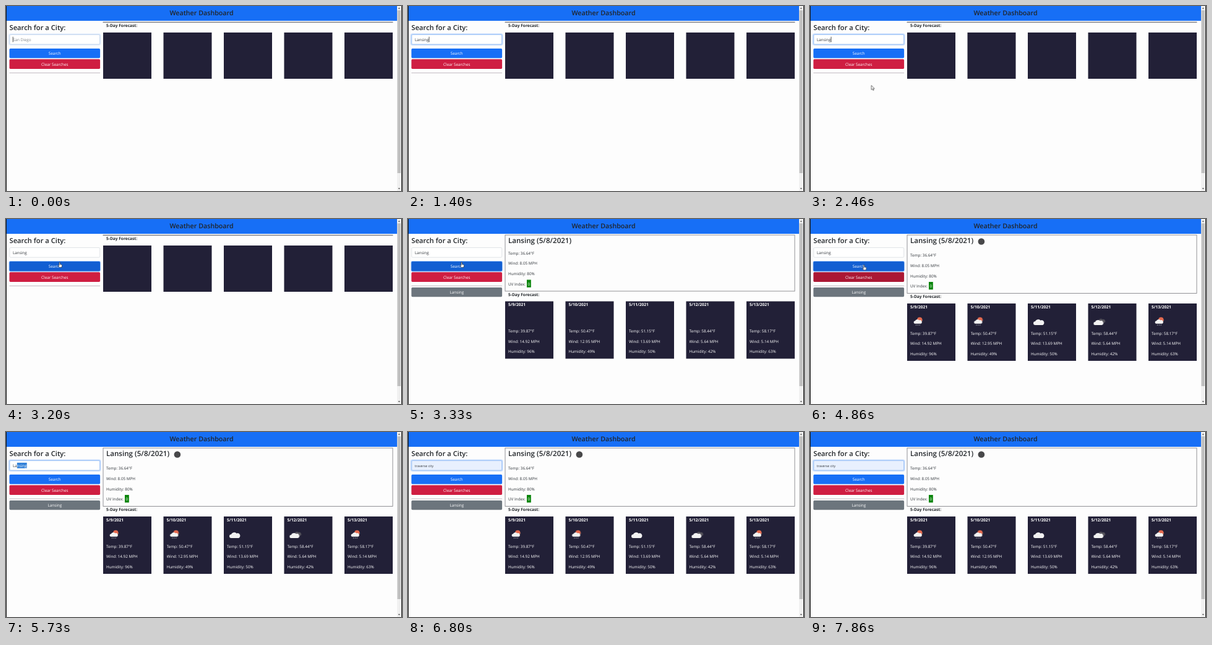
Write an HTML page that moves like this. It is 640 px wide and 300 px high and loops after 8 s.

```html
<!DOCTYPE html>
<html lang="en">
<head>
<meta charset="utf-8">
<title>Weather Dashboard</title>
<style>
  html, body { margin: 0; width: 100%; height: 100%; overflow: hidden; background: #fdfdfd; }
  svg { display: block; width: 640px; height: 300px; }
  text {
    font: 6.35px "Open Sans", "Noto Sans", sans-serif;
    fill: #30353a; text-rendering: geometricPrecision; white-space: pre;
  }
  .title { font-size: 10.7px; font-weight: 600; fill: #212529; text-anchor: middle; }
  .head { font-size: 11.2px; font-weight: 600; fill: #212529; }
  .city { font-size: 11.6px; }
  .bold { font-size: 6.6px; font-weight: 700; fill: #212529; }
  .white { fill: #fff; }
  .btn { fill: #fff; text-anchor: middle; }

  .anim { animation: 8s linear infinite; }
  .step { animation: 8s step-end infinite; }

  #focus { animation-name: focus; }
  #search { fill: #176ff6; animation-name: search; }
  #ring { animation-name: ring; }
  #clear { fill: #cf1e42; animation-name: clear; }
  .results { animation-name: results; }
  .icons { animation-name: icons; }
  #box { animation-name: box; }
  #lines { animation-name: lines; }
  #forecast { animation-name: forecast; }
  .card { fill: #222037; animation-name: card; }
  #pointer { animation-name: pointer; }
  #shown { animation-name: shown; }
  #arrow { animation-name: arrow; }
  #hand { animation-name: hand; }

  @keyframes focus {
    0%, 3.25% { opacity: .45; }
    5.75%, 40% { opacity: 1; }
    40.01%, 65% { opacity: 0; }
    66.9%, 100% { opacity: 1; }
  }
  @keyframes search {
    0%, 35.5% { fill: #176ff6; }
    37.4%, 65% { fill: #125fd2; }
    66.9%, 100% { fill: #176ff6; }
  }
  @keyframes ring { 0% { opacity: 0; } 40% { opacity: 1; } 65%, 100% { opacity: 0; } }
  @keyframes clear {
    0%, 32.4% { fill: #cf1e42; }
    34%, 35.5% { fill: #aa1833; }
    37.4%, 54% { fill: #cf1e42; }
    56%, 60.7% { fill: #aa1833; }
    62.5%, 100% { fill: #cf1e42; }
  }
  @keyframes results { 0% { opacity: 0; } 41.6%, 100% { opacity: 1; } }
  @keyframes icons { 0% { opacity: 0; } 44.1%, 100% { opacity: 1; } }
  @keyframes box { 0% { height: .7px; } 41.6% { height: 91px; } 44.1%, 100% { height: 94.5px; } }
  @keyframes lines { 0% { transform: translateY(-3.5px); } 44.1%, 100% { transform: none; } }
  @keyframes forecast {
    0% { transform: translateY(43px); }
    41.6% { transform: translateY(133.5px); }
    44.1%, 100% { transform: translateY(137px); }
  }
  @keyframes card { 0% { height: 75px; } 41.6%, 100% { height: 93px; } }
  @keyframes pointer {
    0%, 29.1% { transform: translate(106px, 157px); }
    30.8% { transform: translate(99px, 128px); }
    32.5% { transform: translate(92px, 98px); }
    33.3%, 35% { transform: translate(89px, 90px); }
    35.8% { transform: translate(87px, 78px); }
    37.5%, 52.5% { transform: translate(86px, 70px); }
    56.6%, 59.1% { transform: translate(87px, 92px); }
    60.75% { transform: translate(86.5px, 74.5px); }
    61.7%, 100% { transform: translate(82px, 64px); }
  }
  @keyframes shown { 0% { opacity: 0; } 29.1% { opacity: 1; } 61.6%, 100% { opacity: 0; } }
  @keyframes arrow { 0% { opacity: 1; } 32.4%, 100% { opacity: 0; } }
  @keyframes hand { 0% { opacity: 0; } 32.4%, 100% { opacity: 1; } }
</style>
</head>
<body>
<svg viewBox="0 0 640 300" xmlns="http://www.w3.org/2000/svg">
  <defs>
    <path id="cloud" d="M-6 4a3 3 0 0 1 0-6a5 4.8 0 0 1 8.5-1.5a3.8 3.8 0 0 1 3.5 7.5z"/>
    <g id="rain">
      <use href="#cloud" transform="translate(20.5 27) scale(.55)" fill="#55535c"/>
      <circle cx="20.3" cy="26.3" r="4.1" fill="#e4694f"/>
      <use href="#cloud" transform="translate(17.4 29.8) scale(.76)" fill="#f2f2f2"/>
      <path d="M15 34l-.8 2M17.8 34l-.8 2M20.6 34l-.8 2" stroke="#a9abb5" stroke-width=".8"/>
    </g>
    <use id="cloudy" href="#cloud" x="18" y="31" fill="#f2f2f2"/>
    <g id="broken">
      <use href="#cloud" transform="translate(21.5 28.5) scale(.72)" fill="#55535c"/>
      <use href="#cloud" transform="translate(17 31.5) scale(.9)" fill="#f2f2f2"/>
    </g>
  </defs>

  <rect width="640" height="300" fill="#fdfdfd"/>
  <rect x="1" width="631" height="24" fill="#176ff6"/>
  <text class="title" x="316" y="15">Weather Dashboard</text>

  <text class="head" x="5.5" y="39">Search for a City:</text>
  <rect id="field" x="5.9" y="46.4" width="145.8" height="15.8" rx="1.7" fill="#fff" stroke="#d3d8dd" stroke-width=".7"/>
  <g id="focus" class="anim" fill="none">
    <rect x="4.9" y="45.4" width="147.8" height="17.8" rx="2.4" stroke="#c5dcfd" stroke-width="1.6"/>
    <rect x="5.9" y="46.4" width="145.8" height="15.8" rx="1.7" stroke="#8dbafa" stroke-width=".8"/>
  </g>
  <rect id="mark" y="49.8" height="9" fill="#2f7fd8"/>
  <text id="value" x="11" y="56.9"></text>
  <rect id="caret" y="49.8" width=".7" height="8.8" fill="#111"/>

  <rect id="ring" class="step" x="4.7" y="68" width="148.1" height="17.4" rx="2.4" fill="#8fbcf9"/>
  <rect id="search" class="anim" x="5.5" y="69" width="146.6" height="15.5" rx="1.7"/>
  <text class="btn" x="78.8" y="79">Search</text>
  <rect id="clear" class="anim" x="5.5" y="86.3" width="146.6" height="15.7" rx="1.7"/>
  <text class="btn" x="78.8" y="96.6">Clear Searches</text>
  <rect x="5.5" y="108" width="146.6" height=".9" fill="#bcb4bb"/>
  <g class="step results">
    <rect x="5.5" y="111" width="146.6" height="15.3" rx="1.7" fill="#6c757d"/>
    <text class="btn" x="78.8" y="121.1">Lansing</text>
  </g>

  <rect id="box" class="step" x="157" y="26" width="468" height=".7" fill="none" stroke="#85858a" stroke-width=".9"/>
  <g class="step results">
    <text class="head city" x="162" y="39">Lansing (5/8/2021)</text>
    <g id="lines" class="step">
      <text x="162" y="61.1">Temp: 36.64°F</text>
      <text x="162" y="77.8">Wind: 8.05 MPH</text>
      <text x="162" y="94.5">Humidity: 80%</text>
      <text x="162" y="111.1">UV Index:</text>
      <rect x="192" y="102" width="6.8" height="12.4" fill="#0a850c"/>
      <text class="white" x="193.6" y="111.1">0</text>
    </g>
  </g>
  <circle class="step icons" cx="276.9" cy="36.5" r="5.3" fill="#48484a"/>

  <g id="forecast" class="step">
    <text class="bold" x="162" y="-8.8">5-Day Forecast:</text>
  </g>

  <rect x="632" width="7" height="300" fill="#f1f1f1"/>
  <rect x="632.5" y="7" width="5.6" height="264" fill="#c1c1c1"/>
  <path d="M633.6 4.6l1.7-2 1.7 2zM633.6 295.2l1.7 2 1.7-2z" fill="#505050"/>
  <path d="M.5 0V300M639.5 0V300" stroke="#111"/>

  <g id="shown" class="step">
    <g id="pointer" class="anim" fill="#fff" stroke="#111" stroke-width=".6" stroke-linejoin="round">
      <path id="arrow" class="step" d="M0 0V7.2l1.7-1.5 1.2 2.5 1.1-.5-1.1-2.4h2.2z"/>
      <path id="hand" class="step" d="M0 .7a.7.7 0 0 1 1.4 0V3.6l2.4.5q.9.3.8 1.3l-.6 3H.4l-2.2-2.8q.4-1 1.8 0z"/>
    </g>
  </g>
</svg>
<script>
const NS = 'http://www.w3.org/2000/svg';
const $ = id => document.getElementById(id);
const field = $('field'), value = $('value'), mark = $('mark'), caret = $('caret');

function add(parent, tag, attrs, text = '') {
  const node = document.createElementNS(NS, tag);
  for (const key in attrs) node.setAttribute(key, attrs[key]);
  node.textContent = text;
  return parent.appendChild(node);
}

// day, temperature, wind, humidity, icon
[
  [9, '39.87', '14.92', 96, 'rain'],
  [10, '50.47', '12.95', 49, 'rain'],
  [11, '51.15', '13.69', 50, 'cloudy'],
  [12, '58.44', '5.64', 42, 'broken'],
  [13, '58.17', '5.14', 63, 'rain']
].forEach(([day, temp, wind, wet, icon], i) => {
  const g = add($('forecast'), 'g', { transform: `translate(${157 + i * 97.5} 0)` });
  add(g, 'rect', { class: 'card step', width: 78, height: 75 });
  const info = add(g, 'g', { class: 'step results' });
  add(info, 'text', { class: 'bold white', x: 5, y: 7.6 }, `5/${day}/2021`);
  [`Temp: ${temp}°F`, `Wind: ${wind} MPH`, `Humidity: ${wet}%`].forEach((line, n) =>
    add(info, 'text', { class: 'white', x: 5, y: 50.7 + n * 16.6 }, line));
  add(add(g, 'g', { class: 'step icons' }), 'use', { href: '#' + icon });
});

const CITY = 'Lansing';
const keys = [930, 1000, 1070, 1130, 1200, 1330, 1400];
const drag = [5270, 5330, 5400, 5600, 5730, 6260, 6260];
const carets = [[0, 730], [930, 1930], [2460, 3000], [5200, 5270], [6400, 6530]];
const passed = (times, t) => times.filter(x => t >= x).length;

function contents(t) {
  if (t >= 6530) return { text: 'traverse city', size: 5.35, tint: true };
  if (t >= 6400) return { text: 't' };
  const typed = passed(keys, t);
  if (!typed) return { text: 'San Diego', hint: true };
  return { text: CITY.slice(0, typed), picked: passed(drag, t) };
}

let last = '';
function draw(t) {
  const { text, size = 6.35, tint, hint, picked = 0 } = contents(t);
  const on = carets.some(([a, b]) => t >= a && t < b);
  const state = text + picked + on;
  if (state === last) return;
  last = state;

  const cut = text.length - picked;
  value.style.fontSize = size + 'px';
  value.textContent = '';
  add(value, 'tspan', { fill: hint ? '#80868c' : '#30353a' }, text.slice(0, cut));
  add(value, 'tspan', { fill: '#fff' }, text.slice(cut));

  const end = 11 + value.getComputedTextLength();
  const start = cut ? 11 + value.getSubStringLength(0, cut) : 11;
  mark.setAttribute('x', start);
  mark.setAttribute('width', picked ? end - start : 0);
  caret.setAttribute('x', hint ? 10.8 : end);
  caret.style.opacity = on ? 1 : 0;
  field.style.fill = tint ? '#e8f0fe' : '#fff';
}

const begin = performance.now();
function tick() {
  draw((performance.now() - begin) % 8000);
  requestAnimationFrame(tick);
}
tick();
</script>
</body>
</html>
```
